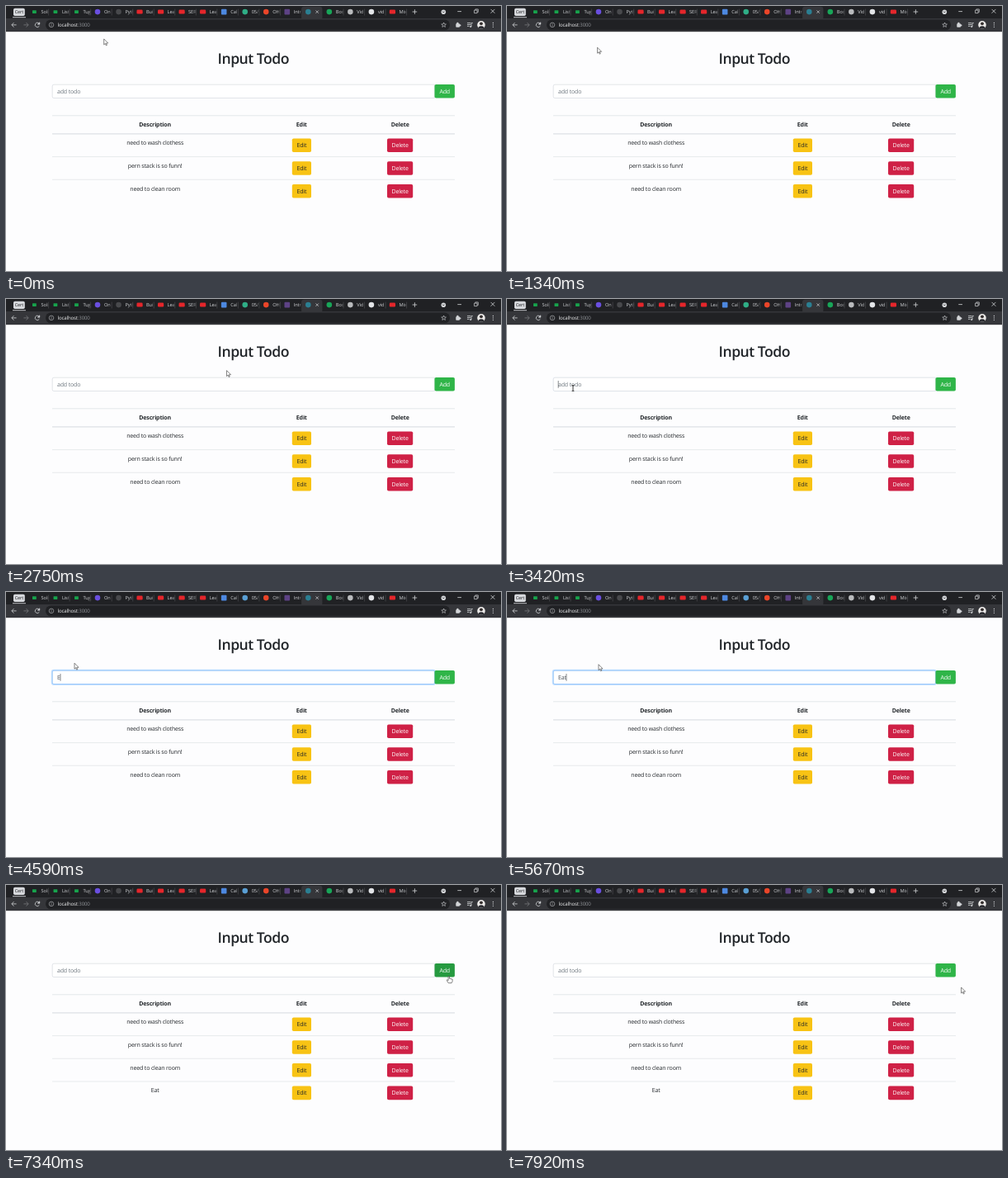
These frames come from a looping animation (600x321 px, 8 s). An HTML page with a canvas:

```html
<!DOCTYPE html>
<html lang="en">
<head>
<meta charset="utf-8">
<title>Input Todo</title>
<style>
html, body { margin: 0; width: 100%; height: 100%; overflow: hidden; background: #fdfdfe; }
canvas { display: block; width: 600px; height: 321px; }
</style>
</head>
<body>
<canvas id="stage"></canvas>
<script>
const W = 600, H = 321, LOOP = 8000;
const canvas = document.getElementById('stage');
const ctx = canvas.getContext('2d');
const dpr = window.devicePixelRatio || 1;
canvas.width = W * dpr;
canvas.height = H * dpr;

const FONT = '"Open Sans", "Noto Sans", sans-serif';
const INK = '#212529', LINE = '#dee2e6', ICON = '#d4d6d9';
const FRAME = '#202124', TOOLBAR = '#35363a';
const FOCUS = 3415, SUBMIT = 7250;
const KEYS = [[4500, 'E'], [4950, 'Ea'], [5300, 'Eat']];
const TODOS = ['need to wash clothess', 'pern stack is so funn!', 'need to clean room'];

// time, x, y of the pointer's hot spot
const PATH = [
  [0, 118.7, 39.9], [700, 118.7, 39.9], [1340, 109.6, 50.2], [1500, 109.6, 50.2],
  [2090, 428.6, 68.2], [2300, 428.6, 68.2], [3250, 80, 108], [3700, 80, 108],
  [4250, 83, 86.2], [5500, 83, 86.2], [6600, 514, 110], [6760, 514, 110],
  [7000, 531, 105], [7250, 531, 105], [7500, 550.6, 124], [8000, 550.6, 124]
];

const RED = '#e5262b', GREEN = '#17a34c';
const TABS = [
  ['Soli', GREEN], ['List', GREEN], ['Tug', GREEN], ['On', '#6a4fe0'],
  ['Pyth', '#48494c'], ['Bui', RED], ['Lea', RED], ['SER', RED], ['Lea', RED],
  ['Cal', '#4d88e0'], ['05/', '#2fae86'], ['OH', '#ea4529'], ['Intr', '#5d4285'],
  ['', '#2b7f92'], ['Boo', '#18a558'], ['Vid', '#b9bbbd'], ['vid', '#e3e5e8'], ['Mix', RED]
];
const ACTIVE = 13;

const clamp = v => Math.max(0, Math.min(1, v));
const ease = v => v * v * (3 - 2 * v);

function box(x, y, w, h, r, fill, stroke, lw = 0.6) {
  ctx.beginPath();
  ctx.roundRect(x, y, w, h, r);
  if (fill) { ctx.fillStyle = fill; ctx.fill(); }
  if (stroke) { ctx.strokeStyle = stroke; ctx.lineWidth = lw; ctx.stroke(); }
}

function disc(x, y, r, fill) {
  ctx.beginPath();
  ctx.arc(x, y, r, 0, 7);
  ctx.fillStyle = fill;
  ctx.fill();
}

function path(points, color, lw = 0.8, fill) {
  ctx.beginPath();
  for (let i = 0; i < points.length; i += 2) ctx.lineTo(points[i], points[i + 1]);
  if (fill) { ctx.closePath(); ctx.fillStyle = fill; ctx.fill(); }
  ctx.strokeStyle = color;
  ctx.lineWidth = lw;
  ctx.stroke();
}

function text(str, x, y, { size = 7, weight = 400, color = INK, align = 'left', track = -0.022 } = {}) {
  ctx.font = `${weight} ${size}px ${FONT}`;
  ctx.letterSpacing = `${track * size}px`;
  ctx.textAlign = align;
  ctx.fillStyle = color;
  ctx.fillText(str, x, y);
}

function drawTabs(t) {
  ctx.fillStyle = FRAME;
  ctx.fillRect(0, 0, W, 15);
  box(9, 2.8, 13.8, 9.2, 1.8, '#d7d9dd');
  path([8, 13.7, 24, 13.7], '#d7d9dd', 0.9);
  text('Cert', 15.9, 9.3, { size: 5.5, align: 'center', color: '#202124' });

  TABS.forEach(([label, color], i) => {
    const x = 34.4 + i * 25.53;
    if (i === ACTIVE) {
      box(x - 8.2, 0.8, 25.3, 16, 3, TOOLBAR);
      path([x + 9.2, 5.4, x + 12.6, 8.8], ICON, 0.7);
      path([x + 12.6, 5.4, x + 9.2, 8.8], ICON, 0.7);
    } else if (i !== ACTIVE - 1) {
      path([x + 17.2, 3.5, x + 17.2, 11.5], '#5a5c60', 0.5);
    }
    if (i === 10 && t >= 3800) color = '#5a9fd4';
    if (color === GREEN && i < 3) box(x - 2.4, 5.2, 4.8, 3.8, 0.4, color);
    else if (color === RED) box(x - 3.6, 4.6, 7.2, 5, 1.3, color);
    else if (i === 9 || i === 12) box(x - 3.3, 3.8, 6.6, 6.6, 1, color);
    else disc(x, 7.1, 3.3, color);

    const fade = ctx.createLinearGradient(x + 14, 0, x + 18, 0);
    fade.addColorStop(0, '#d0d2d5');
    fade.addColorStop(1, 'rgba(208,210,213,0)');
    ctx.save();
    ctx.beginPath();
    ctx.rect(x + 7, 0, 11, 15);
    ctx.clip();
    text(label, x + 8, 9.2, { size: 5.7, color: fade });
    ctx.restore();
  });

  path([492.6, 7, 498.2, 7], ICON);
  path([495.4, 4.2, 495.4, 9.8], ICON);
  disc(530.3, 7.2, 2.8, ICON);
  path([529.1, 6.6, 530.3, 7.9, 531.5, 6.6], '#111', 0.7);
  path([547.3, 6.6, 552, 6.6], ICON);
  box(567.6, 5.1, 3.5, 3.5, 0, null, ICON, 0.7);
  path([568.8, 4.9, 568.8, 3.9, 572.3, 3.9, 572.3, 7.4, 571.3, 7.4], ICON, 0.7);
  path([587.6, 3.9, 592.4, 8.7], ICON);
  path([592.4, 3.9, 587.6, 8.7], ICON);
}

function drawToolbar() {
  ctx.fillStyle = TOOLBAR;
  ctx.fillRect(0, 15, W, 16.2);
  path([12.6, 22.9, 7, 22.9], ICON);
  path([9.5, 20.2, 6.8, 22.9, 9.5, 25.6], ICON);
  path([21.4, 22.9, 27, 22.9], '#77797c');
  path([24.5, 20.2, 27.2, 22.9, 24.5, 25.6], '#77797c');
  ctx.beginPath();
  ctx.arc(38, 22.9, 2.7, 0.5, 5.6);
  ctx.strokeStyle = ICON;
  ctx.lineWidth = 0.8;
  ctx.stroke();
  path([40.8, 19.8, 40.8, 22.2, 38.4, 22.2], ICON, 0.6, ICON);

  box(48, 16.5, 490, 12.8, 6.4, FRAME);
  box(52.2, 20.1, 5.6, 5.6, 2.8, null, '#a8aaad', 0.7);
  path([55, 22.3, 55, 24.4], '#a8aaad', 0.7);
  path([55, 21, 55, 21.6], '#a8aaad', 0.7);
  text('localhost', 62.5, 25.1, { size: 6.1, color: '#f0f1f2' });
  const hostWidth = ctx.measureText('localhost').width;
  text(':3000', 62.5 + hostWidth, 25.1, { size: 6.1, color: '#92959a' });

  const star = [];
  for (let i = 0; i < 11; i++) {
    const a = i * Math.PI / 5 - Math.PI / 2, r = i % 2 ? 1.3 : 3;
    star.push(530.6 + r * Math.cos(a), 23 + r * Math.sin(a));
  }
  path(star, ICON, 0.6);
  box(545.3, 21.2, 4.6, 4.6, 0.7, ICON);
  disc(547.4, 20.9, 1.2, ICON);
  disc(550.2, 23.4, 1.2, ICON);
  for (let i = 0; i < 3; i++) path([559, 20.6 + i * 1.9, i < 2 ? 563.4 : 561.6, 20.6 + i * 1.9], ICON, 0.8);
  path([564, 25, 564, 20.6, 565.8, 20.6], ICON, 0.8);
  disc(563.2, 25, 1, ICON);

  disc(576, 22.9, 4.8, '#eceae8');
  ctx.save();
  ctx.beginPath();
  ctx.arc(576, 22.9, 4.8, 0, 7);
  ctx.clip();
  disc(576, 21.3, 1.9, '#35302f');
  disc(576, 28, 3.8, '#2a2b30');
  ctx.restore();
  for (let y = 20.5; y < 26; y += 2.4) disc(590.4, y, 0.65, ICON);
}

function button(label, cx, y, w, fill, color) {
  box(cx - w / 2, y, w, 16.6, 1.8, fill);
  text(label, cx, y + 10.8, { align: 'center', color });
}

function drawForm(t, overAdd) {
  const focused = t >= FOCUS && t < SUBMIT;
  const glow = focused ? clamp((t - FOCUS) / 150) : 0;
  const typed = focused ? KEYS.filter(k => k[0] <= t).pop() : null;
  const value = typed ? typed[1] : '';

  box(56.2, 95.2, 463.4, 16.3, [1.8, 0, 0, 1.8], '#fff', '#ced4da');
  if (glow) {
    ctx.globalAlpha = glow;
    box(55.5, 94.5, 464.8, 17.7, 2.4, null, '#bfdeff', 1.5);
    box(56.2, 95.2, 463.4, 16.3, 1.8, null, '#80bdff');
    ctx.globalAlpha = 1;
  }
  text(value || 'add todo', 62, 106.1, { color: value ? '#495057' : '#6c757d' });
  const since = t - (typed ? typed[0] : FOCUS);
  if (focused && since % 1060 < 530) {
    const x = 62.2 + (value ? ctx.measureText(value).width : 0);
    path([x, 99, x, 107.8], '#33383d', 0.6);
  }
  button('Add', 531.7, 94.9, 24.4, overAdd ? '#269a40' : '#2fb548', '#fff');
}

function drawTable(rows) {
  const rule = (y, lw) => path([56, y, 544, y], LINE, lw);
  const head = { weight: 700, align: 'center' };
  rule(132.8, 0.8);
  text('Description', 180.6, 146.3, head);
  text('Edit', 358.3, 146.3, head);
  text('Delete', 477.7, 146.3, head);
  rule(154.9, 1.1);
  rows.forEach((todo, i) => {
    const y = 154.9 + i * 27.7;
    if (i) rule(y, 0.7);
    text(todo, 180.7, y + 13.4, { align: 'center' });
    button('Edit', 358.4, y + 5.6, 23.2, '#f8c314', INK);
    button('Delete', 477.6, y + 5.6, 31.2, '#cf2146', '#fff');
  });
}

function pointerAt(t) {
  let i = 1;
  while (i < PATH.length - 1 && PATH[i][0] < t) i++;
  const [t0, x0, y0] = PATH[i - 1], [t1, x1, y1] = PATH[i];
  const k = ease(clamp((t - t0) / (t1 - t0)));
  return [x0 + (x1 - x0) * k, y0 + (y1 - y0) * k];
}

function drawPointer(x, y, kind) {
  ctx.save();
  ctx.translate(x, y);
  if (kind === 'text') {
    path([-1.4, -3.4, 1.4, -3.4], '#222', 0.8);
    path([0, -3.4, 0, 3.4], '#222', 0.9);
    path([-1.4, 3.4, 1.4, 3.4], '#222', 0.8);
  } else if (kind === 'hand') {
    path([-0.8, 0, 0.6, 0, 0.6, 2.6, 4.2, 3.4, 4.2, 6, 3.2, 8, -0.6, 8, -2.8, 4.6, -2, 4, -0.8, 5], '#333', 0.6, '#fff');
  } else {
    path([0, 0, 0, 7, 1.6, 5.5, 2.7, 8, 3.7, 7.5, 2.7, 5.2, 5, 5.1], '#444', 0.65, '#fff');
  }
  ctx.restore();
}

function draw(t) {
  ctx.setTransform(dpr, 0, 0, dpr, 0, 0);
  ctx.textRendering = 'geometricPrecision';
  ctx.fillStyle = '#fdfdfe';
  ctx.fillRect(0, 0, W, H);
  drawTabs(t);
  drawToolbar();

  const [x, y] = pointerAt(t);
  const inRow = y > 95 && y < 112;
  const overAdd = inRow && x > 519.5 && x < 544;
  const kind = overAdd ? 'hand' : inRow && x > 56 && x < 519.5 ? 'text' : 'arrow';
  text('Input Todo', 299.8, 70, { size: 17.6, weight: 600, align: 'center', track: -0.028 });
  drawForm(t, overAdd);
  drawTable(t < SUBMIT ? TODOS : [...TODOS, 'Eat']);
  drawPointer(x, y, kind);
}

const start = performance.now();
function tick() {
  draw((performance.now() - start) % LOOP);
  requestAnimationFrame(tick);
}
tick();
</script>
</body>
</html>
```
